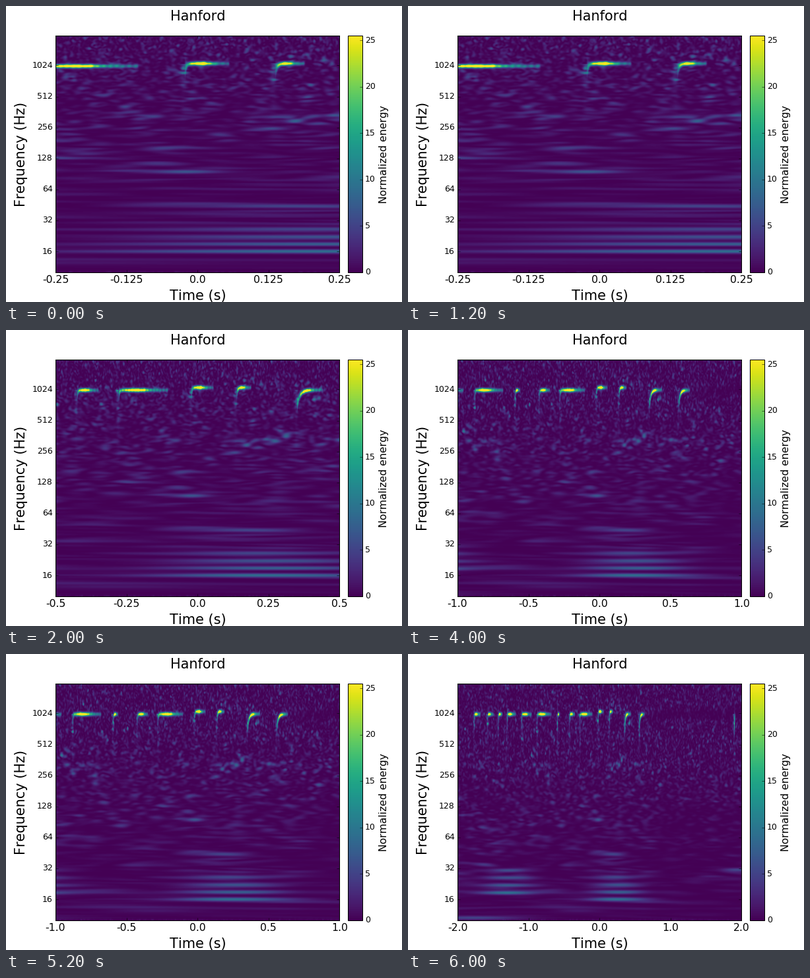
These frames come from a looping animation (600 px wide and 450 px high, 8000 ms). A matplotlib script:

```python
import numpy as np
import matplotlib.pyplot as plt
from matplotlib.animation import FuncAnimation

plt.rcParams.update({"font.family": "DejaVu Sans", "text.kerning_factor": 6,
                     "ytick.alignment": "center"})

W, H, DPI = 600, 450, 75
LEFT, TOP, AX_WIDTH = 75, 45, 430.4
COLS, ROWS = 431, 360
FULL = COLS * 8
OCTAVE = ROWS / np.log2(2000 / 10)
SPANS = [0.25, 0.5, 1.0, 2.0]

# Start and length of each chirp, in seconds
CHIRPS = [(-1.77, .09), (-1.58, .08), (-1.43, .06), (-1.305, .125), (-1.10, .14),
          (-0.88, .2), (-0.595, .035), (-0.425, .075), (-0.278, .173),
          (-0.022, .077), (0.137, .051), (0.35, .09), (0.556, .08), (1.893, .02)]
# Time and frequency of single wisps
WISPS = [(0.17, 44), (-0.03, 95), (0.13, 250), (1.95, 31), (-1.8, 10.6)]
# Time and lowest frequency of the two rumbles
RUMBLES = [(0.25, 16), (-1.3, 18.6)]

rows = np.arange(ROWS)[:, None] + 0.5
freqs = 10 * 2 ** ((ROWS - rows) / OCTAVE)
rng = np.random.default_rng(12)
white = rng.standard_normal((ROWS, FULL)) + 1j * rng.standard_normal((ROWS, FULL))


def row_of(freq):
    return ROWS - OCTAVE * np.log2(freq / 10)


def bell(x, width):
    return np.exp(-0.5 * (x / width) ** 2)


def make_blobs():
    """Time, frequency, duration and energy of every soft streak."""
    blobs = [(t, f, 5 / f, 5) for t, f in WISPS]
    for t, base in RUMBLES:
        for k in range(4):
            blobs.append((t, base * 1.18 ** k, 0.3 * 0.9 ** k, 9 * 0.8 ** k))
    for t in rng.uniform(-1.95, 0.7, 30):
        blobs.append((t, rng.normal(325, 9), 5 / 330, rng.uniform(1, 4)))
    return blobs


def smooth(z, sigma, axis):
    """Gaussian blur that keeps the variance of white noise."""
    k = 2 * np.pi * np.fft.fftfreq(z.shape[axis])
    response = bell((k if axis else k[:, None]) * sigma, 1)
    response = response / np.sqrt((response ** 2).mean(axis, keepdims=True))
    return np.fft.ifft(np.fft.fft(z, axis=axis) * response, axis=axis)


def noise(step):
    """Constant-Q noise energy, mean one, at a given zoom."""
    n = FULL // step
    z = white.reshape(ROWS, n, step).sum(2) / np.sqrt(step)
    z = smooth(z, np.maximum(4 / freqs * n / 4, 1.0), 1)
    start = (n - COLS) // 2
    z = smooth(z[:, start:start + COLS], 2.0, 0)
    return np.abs(z) ** 2 / 2


def chirp(t, blur, start, length):
    end = start + length
    sweep = np.clip(start / 0.35, 0, 1) ** 2
    drop, rise = 7 + 15 * sweep, .003 + .008 * sweep
    offset = drop * np.exp(-np.maximum(t - start, 0) / rise)
    thick = np.hypot(1.9, offset / rise * blur)
    gate = 0.25 * (1 + np.tanh(2 * (t - start) / blur)) * (1 + np.tanh(2 * (end - t) / blur))
    phase = (t - start) / length
    level = (15 - 6 * np.clip(phase, 0, 1)) * (0.9 + 0.15 * np.cos(2 * np.pi * t / .011))
    level = level + 20 * bell(phase - 0.35, 0.18)
    below = rows - 46.5 + 5 * bell(start - .06, .12)
    line = gate * level * np.sqrt(1.9 / thick) * bell(below - offset, thick)
    streak = bell(t - start + .003, blur * 1.3) * (below > 0) * np.exp(-np.maximum(below, 0) / 26)
    return line, streak


def spectrogram(i):
    span = SPANS[i]
    t = np.linspace(-span, span, COLS)[None, :]
    blur = max(.003, 1.6 * span / COLS)
    late = 1 / (1 + np.exp(-(t - 0.7) / .04))
    gain = 0.4 + 0.5 / (1 + np.exp((rows - 200) / 40))
    gain = gain * (1 - 0.4 * late * (rows > 180)) * (1 - 0.75 * late * bell(rows - 46, 6))
    signal = np.zeros((ROWS, COLS))
    for start, length in CHIRPS:
        line, streak = chirp(t, blur, start, length)
        signal += line + 3 * streak
        gain = gain + 2 * streak
    for when, freq, length, energy in blobs:
        signal += energy * bell(t - when, length) * bell(rows - row_of(freq), 2.0)
    return noise(2 ** i) * gain + signal


fig = plt.figure(figsize=(W / DPI, H / DPI), dpi=DPI, facecolor="white")


def box(x, width):
    return fig.add_axes([x / W, 1 - (TOP + ROWS) / H, width / W, ROWS / H])


def label(x, y, text, size, rotation=0):
    fig.text(x / W, 1 - y / H, text, fontsize=size, rotation=rotation,
             ha="center", va="baseline", rotation_mode="anchor")


def label_times(i):
    ax.set_xticks(range(5), [str(SPANS[i] * k / 2) for k in range(-2, 3)])


blobs = make_blobs()
images = [spectrogram(i) for i in range(len(SPANS))]

ax = box(LEFT, AX_WIDTH)
image = ax.imshow(images[0], cmap="viridis", vmin=0, vmax=25.5, aspect="auto",
                  extent=[0, 4, ROWS, 0], interpolation="nearest")
pitches = [2 ** k for k in range(4, 11)]
ax.set_yticks([row_of(p) for p in pitches], [str(p) for p in pitches])
label_times(0)

cax = box(518.4, 21.6)
bar = fig.colorbar(image, cax=cax, ticks=range(0, 26, 5))
for axes in (ax, cax):
    axes.tick_params(direction="in", length=4, width=0.5, pad=4, labelsize=12)
ax.tick_params(top=True, right=True)
ax.tick_params(axis="x", labelsize=15)
for spine in [*ax.spines.values(), bar.outline]:
    spine.set_linewidth(1)

label(290.7, 22.5, "Hanford", 20)
label(290.5, 446.5, "Time (s)", 20)
label(29, 225, "Frequency (Hz)", 20, 90)
label(577, 225, "Normalized energy", 15, 90)


def update(i):
    image.set_data(images[i])
    label_times(i)
    return [image]


anim = FuncAnimation(fig, update, frames=len(SPANS), interval=2000, repeat=True, repeat_delay=0)
plt.show()
```
